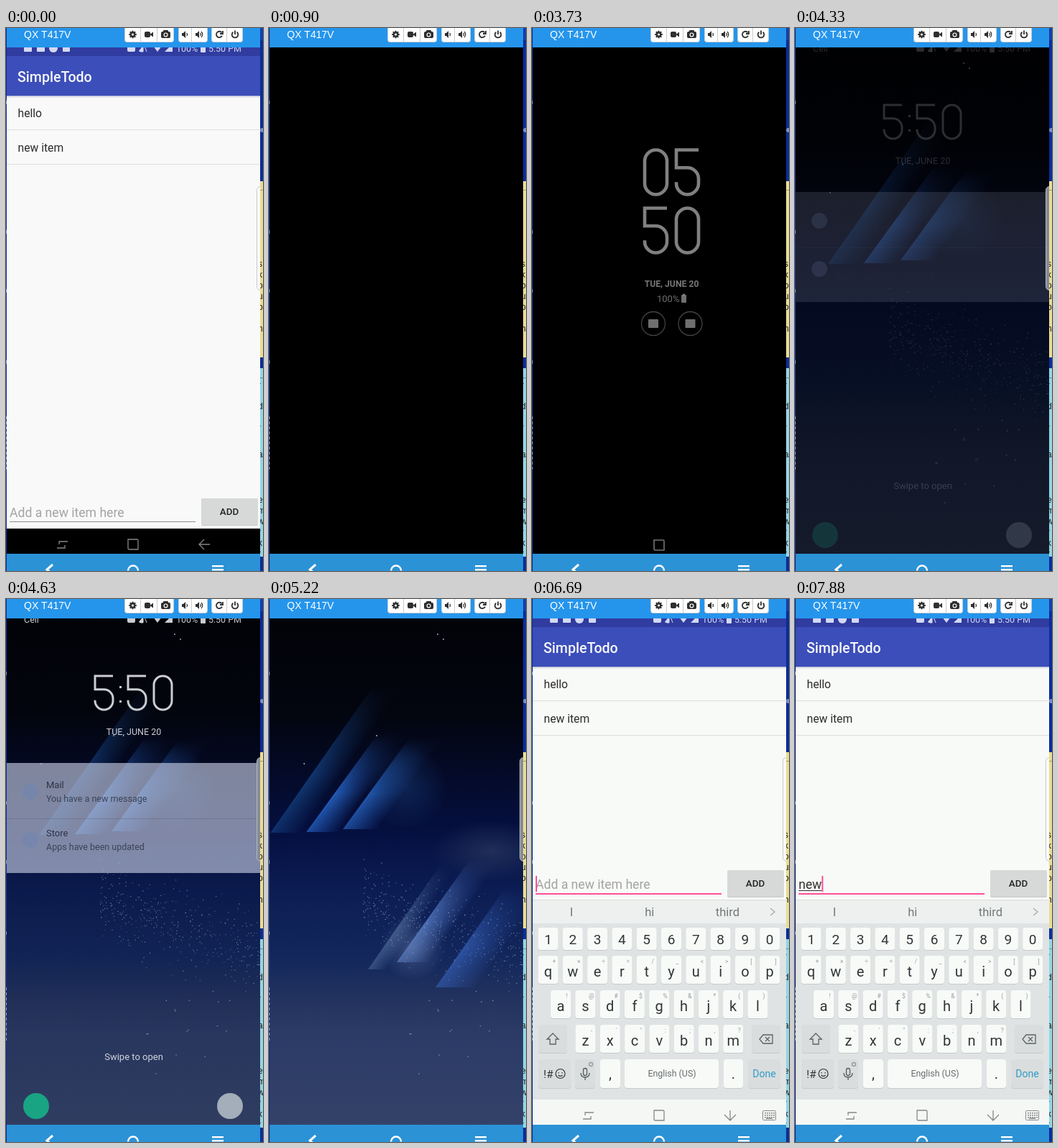
Recreate the animation shown at these times as an HTML page with a canvas. Size 358 by 755 pixels, loop 8000 ms.

```html
<!DOCTYPE html>
<html lang="en">
<head>
<meta charset="utf-8">
<title>Todo app on a mirrored phone</title>
<style>
  html, body { margin: 0; width: 100%; height: 100%; overflow: hidden; background: #0a2d9a; }
  canvas { display: block; }
</style>
</head>
<body>
<canvas id="stage" width="358" height="755"></canvas>
<script>
const LOOP = 8000, TICK = 148.68;
const ctx = document.getElementById('stage').getContext('2d');
const ROBOTO = 'Roboto, sans-serif', ARIAL = '"Liberation Sans", Arial, sans-serif';

function rect(x, y, w, h, color) { ctx.fillStyle = color; ctx.fillRect(x, y, w, h); }

function round(x, y, w, h, r, fill, stroke) {
  ctx.beginPath();
  ctx.roundRect(x, y, w, h, r);
  if (fill) { ctx.fillStyle = fill; ctx.fill(); }
  if (stroke) { ctx.strokeStyle = stroke; ctx.stroke(); }
}

function disc(x, y, r, fill, stroke) { round(x - r, y - r, 2 * r, 2 * r, r, fill, stroke); }

function text(s, x, y, size, color, { align = 'left', weight = 400, family = ROBOTO } = {}) {
  ctx.font = `${weight} ${size}px ${family}`;
  ctx.textAlign = align;
  ctx.fillStyle = color;
  ctx.fillText(s, x, y);
}

// Strokes an SVG path moved to (x, y); fills it as well when asked.
function icon(d, x, y, color, width = 1.5, filled = false) {
  const path = new Path2D(d);
  ctx.save();
  ctx.translate(x, y);
  ctx.strokeStyle = ctx.fillStyle = color;
  ctx.lineWidth = width;
  if (filled) ctx.fill(path);
  if (width) ctx.stroke(path);
  ctx.restore();
}

function faded(alpha, draw) {
  ctx.save();
  ctx.globalAlpha *= alpha;
  draw();
  ctx.restore();
}

function random(seed) {
  return () => (seed = (seed * 16807) % 2147483647) / 2147483647;
}

// ---- Desktop and mirror window ----

function desktop() {
  rect(0, 0, 358, 755, '#0a2d9a');
  rect(354, 0, 4, 17, '#123fae');
  rect(354, 213, 4, 245, '#eadc94');
  rect(354, 225, 4, 1, '#a39a68');
  rect(354, 473, 4, 262, '#94d5e4');
  rect(354, 486, 4, 1, '#5f929e');
  disc(357, 142, 3, '#7d8fc6');
  ctx.save();
  ctx.beginPath();
  ctx.rect(354, 0, 4, 755);
  ctx.clip();
  const column = (letters, y, step) =>
    [...letters].forEach((c, i) => text(c, 351, y + i * step, 12, '#1c1c1c', { family: ARIAL }));
  column(':', 242, 0);
  column('skoup h', 332, 15);
  column('r', 501, 0);
  column('dr', 530, 30);
  column('a', 597, 0);
  column('emwrkr', 660, 15);
  ctx.restore();
  for (const y of [101, 281, 363, 462]) rect(0, y, 1, 5, '#6f8fd0');
  for (let y = 540; y < 612; y += 7) rect(0, y, 1, 4, '#7f9cd8');
}

function toolbar() {
  const ink = '#2f2f2f';
  rect(1, 0, 353, 27, '#2595ec');
  text('QX T417V', 25, 14, 14, '#fff', { family: ARIAL });
  ctx.lineWidth = 1;
  for (const [x, w, ...dividers] of [[165, 69, 188, 211], [240, 41, 259], [286, 44, 308]]) {
    round(x + .5, -5.5, w - 1, 25, 3, '#fff', '#c4cdd4');
    dividers.forEach(d => rect(d - 1, 0, 1, 19, '#ccc'));
  }
  for (let i = 0; i < 4; i++) {
    const a = i * Math.PI / 4, c = 5.3 * Math.cos(a), s = 5.3 * Math.sin(a);
    icon(`M${-c} ${-s}L${c} ${s}`, 176.5, 9, ink, 2);
  }
  disc(176.5, 9, 3.9, ink);
  disc(176.5, 9, 1.6, '#fff');
  round(193, 5, 8, 8, 2, ink);
  icon('M0 0L4-3V4L0 1Z', 201, 8.5, ink, 0, true);
  round(216, 5, 13, 9, 2, ink);
  round(219, 3, 7, 4, 1, ink);
  disc(222.5, 9.4, 3, '#fff');
  disc(222.5, 9.4, 1.8, ink);
  const speaker = 'M-4-2H-2L1-5V5L-2 2H-4Z';
  icon(speaker, 249, 9, ink, 0, true);
  icon('M2.5-2Q4.5 0 2.5 2', 249, 9, ink, 1.2);
  icon(speaker, 268, 9, ink, 0, true);
  icon('M2.5-2Q4.5 0 2.5 2M4-4Q7.5 0 4 4', 268, 9, ink, 1.2);
  icon('M3.5-2.6A4.2 4.2 0 1 0 4 1.6M5-5V-1H1', 297, 9, ink, 1.8);
  icon('M-2.6-3.3A4.3 4.3 0 1 0 2.6-3.3M0-5.5V0', 319, 9, ink, 1.8);
}

function bottomBar() {
  rect(1, 731, 353, 24, '#2b92d6');
  icon('M5-6L-3 1L5 8', 60, 752, '#fff', 3);
  icon('M-7 0A7 7 0 0 1 7 0', 177, 754.5, '#fff', 2.4);
  for (const y of [747, 752]) rect(287, y, 16, 2.4, '#fff');
}

// ---- Phone parts ----

const HOME = 'M-2-7H5.5A1.5 1.5 0 0 1 7-5.5V7H2M-2 7H-5.5A1.5 1.5 0 0 1-7 5.5V-7H2M2 7H-2';

function navBar(keyboardOpen) {
  rect(1, 696, 353, 35, keyboardOpen ? '#f5f7f5' : '#000');
  const ink = keyboardOpen ? '#848987' : '#858585';
  icon('M8-4H-4V0M-7 5H4V1', 78, 718, ink, 1.3);
  icon(HOME, 177, 718, ink, 1.3);
  if (keyboardOpen) {
    icon('M0-7V7M-8-1L0 7L8-1', 276, 718, ink, 1.3);
    ctx.lineWidth = 1;
    round(321.5, 711.5, 18, 13, 1, null, ink);
    for (let y = 714; y < 721; y += 3)
      for (let x = 324; x < 338; x += 3) rect(x, y, 2, 1.5, ink);
    rect(326, 721.5, 9, 1.5, ink);
  } else {
    icon('M8 0H-7M0-7L-7 0L0 7', 276, 718, ink, 1.3);
  }
}

function statusIcons(color) {
  round(25, 23, 11, 10, 1, color);
  round(43, 22, 11, 11, 1, color);
  disc(66, 28, 6, color);
  round(79, 23, 10, 10, 1, color);
  statusRight(color);
}

function statusRight(color) {
  round(169, 23, 11, 10, 2, color);
  icon('M-3.5 3L2-4V4H-1Z M4-4L7 4', 189, 29, color, 1, true);
  icon('M-6-4Q0-9 6-4L0 4Z', 211, 29, color, 0, true);
  icon('M-5 4L6-7V4Z', 226, 29, color, 0, true);
  text('100%', 237, 33, 12.5, color);
  round(271, 24, 7, 10, 1, color);
  text('5:50 PM', 282, 33, 12.5, color);
}

function edgeHandle(fill, border) {
  ctx.lineWidth = 1;
  round(349.5, 220.5, 12, 144, 5, fill, border);
}

// ---- Todo app ----

function app({ typed = null, raised = false, smeared = false }) {
  rect(1, 27, 353, 704, smeared ? '#f6f6fa' : raised ? '#f8faf7' : '#f9f9f9');
  rect(1, 27, 353, 12, '#303c9f');
  statusIcons(smeared ? '#9da5d6' : '#d5d9f1');
  rect(1, 39, 353, 55, smeared ? '#4049b5' : '#3c4eb9');
  rect(1, 94, 353, 1, '#a9afd0');
  rect(1, 95, 353, 2, '#e6e7ec');
  text('SimpleTodo', 16, 75, 19.6, '#f6f7fc', { weight: 500 });
  text('hello', 16.5, 124, 15.7, '#2c2c2c');
  text('new item', 16.5, 172, 15.7, '#2c2c2c');
  if (smeared) smears();
  else for (const y of [142, 190]) rect(1, y - 1, 353, 1, '#dedede');

  const top = raised ? 377 : 654;
  round(272, top + 1, 79, 37, 2, '#c6c7c7');
  round(272, top, 79, 37, 2, smeared ? '#d9dddd' : '#d7d8d8');
  text('ADD', 311, top + 23, 13.4, '#252525', { weight: 500, align: 'center' });
  if (typed === null) {
    rect(5, top + 32, smeared ? 261 : 259, 1, '#8d8d8d');
    text('Add a new item here', smeared ? 3.5 : 5, top + 26, 17.6, smeared ? '#b4b4b6' : '#a3a3a3');
  } else {
    const pink = '#ff4f96';
    rect(5, top + 32, 259, 2, pink);
    if (!typed) text('Add a new item here', 5, top + 26, 17.6, '#a3a3a3');
    text(typed, 5, top + 26, 17.6, '#303030');
    const width = ctx.measureText(typed).width;
    if (typed) rect(5, top + 28, width, 1, '#303030');
    rect(5 + width, top + 8, 2, 22, pink);
  }
  navBar(false);
  if (!smeared) edgeHandle('#fafafa', '#c9c9c9');
}

function smears() {
  rect(88, 197, 243, 10, '#ecedf6');
  for (let x = 76; x < 331; x += 4) rect(x, 226, 3, 1, '#e3e4ec');
  rect(152, 289, 62, 2, '#e6e7f3');
  rect(226, 288, 84, 2, '#e8e9f3');
  rect(163, 403, 52, 2, '#e5e8ec');
  const next = random(77);
  for (let i = 0; i < 20; i++)
    rect(60 + next() * 200, 265 + next() * 330, 20 + next() * 60, 1 + next() * 7, i % 2 ? '#f1f5f5' : '#f2f2f8');
}

// ---- Keyboard ----

function keyboard() {
  const ink = '#303536', grey = '#dadddd', white = '#f8faf8';
  const key = (x, y, w, h, fill = white) => {
    round(x, y + 1, w, h, 4, '#c6caca');
    round(x, y, w, h, 4, fill);
  };
  const row = (letters, hints, x, y, h) => [...letters].forEach((c, i) => {
    const cx = x + i * 34.3;
    key(cx - 14, y, 28, h);
    text(c, cx, y + h / 2 + (hints ? 9 : 7), hints ? 20 : 19, ink, { align: 'center' });
    if (hints) text(hints[i], cx + 8.5, y + 11, 8.5, '#969c9c', { align: 'center' });
  });

  rect(1, 418, 353, 278, '#e0e3e3');
  rect(1, 418, 353, 33, '#eef0f0');
  rect(1, 418, 353, 1, '#dadddc');
  ['I', 'hi', 'third'].forEach((s, i) =>
    text(s, 55 + i * 108.7, 441, 16.5, '#727879', { align: 'center' }));
  icon('M-3-5L3 0L-3 5', 335, 435, '#a4a9a9', 1.3);
  row('1234567890', '', 22.5, 457, 31);
  row('qwertyuiop', '+×÷=/_<>[]', 22.5, 496, 39);
  row('asdfghjkl', '!@#$%&*()', 40, 544, 39);
  row('zxcvbnm', '-\'":;,?', 74.5, 592, 39);

  key(9, 592, 40, 39, grey);
  icon('M0-8L8 0H4V7H-4V0H-8Z', 29, 612, '#5b6162', 1.3);
  key(306, 592, 40, 39, grey);
  icon('M-9 0L-4-6H9V6H-4Z M-1-3L5 3M5-3L-1 3', 326, 612, '#5b6162', 1.3);
  key(9, 640, 45, 40, grey);
  text('!#', 16, 666, 15.5, ink);
  ctx.lineWidth = 1.2;
  disc(39.5, 660, 6.5, null, ink);
  icon('M-3 2Q0 5 3 2M-2.5-2V-.5M2.5-2V-.5', 39.5, 660, ink, 1.2);
  key(60, 640, 28, 40, grey);
  ctx.lineWidth = 1.3;
  round(71.5, 652.5, 5, 10, 2.5, null, '#555b5c');
  icon('M-6-1Q-6 5 0 5T6-1M0 5V9', 74, 660, '#555b5c', 1.3);
  ctx.lineWidth = 1.5;
  disc(82, 647, 2.5, null, '#9a9f9f');
  key(95, 640, 28, 40);
  text(',', 109, 667, 20, ink, { align: 'center' });
  key(129, 640, 131, 40);
  text('English (US)', 195, 664, 12.4, '#666c6d', { align: 'center' });
  key(267, 640, 27, 40);
  text('.', 280.5, 667, 20, ink, { align: 'center' });
  key(301, 640, 45, 40, grey);
  text('Done', 323.5, 665, 14, '#2f9bc9', { align: 'center' });
}

// ---- Clock and lock screens ----

function digit(c, x, y, w, h) {
  const r = w / 2;
  ctx.beginPath();
  if (c === '0') ctx.roundRect(x, y, w, h, r);
  else {
    const bend = y + h * .4;
    ctx.moveTo(x + w, y);
    ctx.lineTo(x, y);
    ctx.lineTo(x, bend);
    ctx.lineTo(x + r, bend);
    ctx.arcTo(x + w, bend, x + w, y + h, r);
    ctx.arcTo(x + w, y + h, x, y + h, r);
    ctx.arcTo(x, y + h, x, y, r);
    ctx.lineTo(x, y + h * .72);
  }
  ctx.stroke();
}

function clockScreen() {
  ctx.strokeStyle = '#fff';
  ctx.lineWidth = 4.6;
  ['05', '50'].forEach((pair, line) => [...pair].forEach((c, i) =>
    digit(c, 157 + i * 44, 169.5 + line * 81, 31, 62)));
  text('TUE, JUNE 20', 194.5, 360, 12.2, '#e9e9e9', { align: 'center', weight: 700 });
  text('100%', 174, 381, 13, '#e0e0e0');
  round(208, 371, 7, 11, 1, '#e0e0e0');
  rect(210, 369.5, 3, 2, '#e0e0e0');
  ctx.lineWidth = 1.3;
  for (const x of [169, 220.5]) {
    disc(x, 411, 16.5, null, '#858585');
    round(x - 7, 405, 14, 12, 1, '#dcdcdc');
  }
  icon(HOME, 177, 719, '#e8e8e8', 1.6);
}

// A slanted beam, brightest at its foot and left edge, built from thin strips.
function beam(x0, y0, x1, y1, width, rgb, alpha) {
  const strips = 10, step = width / strips;
  for (let i = 0; i < strips; i++) {
    const a = alpha * (1 - i / strips), x = i * step;
    const g = ctx.createLinearGradient(x0 + x, y0, x1 + x, y1);
    g.addColorStop(0, `rgba(${rgb},${a * .8})`);
    g.addColorStop(.4, `rgba(${rgb},${a})`);
    g.addColorStop(1, `rgba(${rgb},0)`);
    ctx.fillStyle = g;
    ctx.beginPath();
    ctx.moveTo(x0 + x, y0);
    ctx.lineTo(x1 + x, y1);
    ctx.lineTo(x1 + x + step, y1);
    ctx.lineTo(x0 + x + step, y0);
    ctx.fill();
  }
}

function glow(x, y, r, rgb, alpha) {
  const g = ctx.createRadialGradient(x, y, 0, x, y, r);
  g.addColorStop(0, `rgba(${rgb},${alpha})`);
  g.addColorStop(1, `rgba(${rgb},0)`);
  rect(x - r, y - r, 2 * r, 2 * r, g);
}

// open runs from 0 (locked) to 1 (unlocked): the upper beams slide, the lower ones appear.
function wallpaper(open) {
  const g = ctx.createLinearGradient(0, 27, 0, 731);
  [[0, '#020308'], [.19, '#03050f'], [.32, '#040b2b'], [.43, '#051042'], [.53, '#0b1c52'],
   [.67, '#13275c'], [.76, '#24345f'], [.82, '#2b3b66'], [1, '#344269']]
    .forEach(([at, color]) => g.addColorStop(at, color));
  rect(1, 27, 353, 704, g);
  ctx.save();
  ctx.translate(44 * (1 - open), 3 * (1 - open));
  beam(2, 325, 146, 120, 40, '22,72,140', .7);
  beam(52, 324, 152, 187, 42, '38,98,195', .9);
  beam(103, 320, 196, 193, 46, '38,98,190', .85);
  glow(190, 262, 58, '30,80,150', .35);
  ctx.restore();
  faded(open, () => {
    ctx.save();
    ctx.translate(310, 350);
    ctx.scale(2, 1);
    glow(0, 0, 42, '62,78,108', .45);
    ctx.restore();
    beam(138, 515, 240, 368, 24, '88,120,165', .6);
    beam(178, 505, 280, 362, 42, '84,122,195', .85);
    beam(232, 540, 330, 400, 54, '56,100,190', .7);
    glow(200, 485, 45, '120,140,185', .4);
  });
  const next = random(4321);
  for (let i = 0; i < 420; i++) {
    const u = next(), spread = next() + next() + next() - 1.5;
    rect(130 + u * 224, 420 + u * 70 + spread * 55, 1.2, 1.2, `rgba(180,198,230,${.2 + next() * .5})`);
  }
  for (let i = 0; i < 16; i++) rect(190 + next() * 150, 540 + next() * 120, 1.4, 1.4, '#7f8cad');
  for (const [x, y] of [[234, 48], [242, 55], [149, 189], [48, 228]]) rect(x, y, 2, 2, '#778196');
}

function lockItems() {
  const white = '#eef0f4', center = { align: 'center' };
  text('Cell', 25, 33, 12.5, white);
  statusRight(white);
  ctx.strokeStyle = white;
  ctx.lineWidth = 3;
  digit('5', 124, 107, 25, 47);
  digit('5', 170, 107, 25, 47);
  digit('0', 206, 107, 25, 47);
  for (const y of [121, 141]) rect(158, y, 3, 3, white);
  text('TUE, JUNE 20', 178, 189, 12.5, white, center);
  rect(1, 228, 353, 153, 'rgba(190,198,220,.78)');
  rect(1, 305, 353, 1, 'rgba(90,98,120,.5)');
  for (const [y, title, body] of [[268, 'Mail', 'You have a new message'], [335, 'Store', 'Apps have been updated']]) {
    disc(34, y, 11, '#7486ad');
    text(title, 56, y - 5, 13, '#1d2233');
    text(body, 56, y + 14, 12.5, '#30364a');
  }
  text('Swipe to open', 178, 641, 13, white, center);
  disc(42, 705, 18, '#16b88a');
  disc(312, 705, 18, '#b9c2cb');
}

function lockScreen(light, items, open) {
  faded(light, () => wallpaper(open));
  if (items) faded(items, lockItems);
  edgeHandle('#858c97', '#b4b9c1');
}

// ---- Timeline, in ticks ----

function screen(k) {
  rect(1, 27, 353, 704, '#000');
  if (k < 6) {
    app({});
    if (k > 3) rect(1, 27, 353, 704, `rgba(0,0,0,${k === 4 ? .45 : .82})`);
  } else if (k >= 15 && k < 28) {
    faded(k < 25 ? Math.min(.75, .28 + .1 * (k - 15)) : .5 - .2 * (k - 25), clockScreen);
  } else if (k >= 28 && k < 33) {
    lockScreen([.2, .4, .75, .92, 1][k - 28], [.08, .18, .5, .85, 1][k - 28], 0);
  } else if (k >= 33 && k < 38) {
    const open = Math.min(1, (k - 32) / 3);
    lockScreen(1, [1, .7, .3][k - 32] || 0, open);
    if (k > 35) faded(k === 36 ? .45 : .9, () => app({ smeared: true }));
  } else if (k >= 38 && k < 41) {
    app({ smeared: k === 38 });
  } else if (k >= 41) {
    app({ typed: 'new'.slice(0, k < 49 ? 0 : Math.floor((k - 47) / 2)), raised: k >= 44 });
    if (k > 41) {
      ctx.save();
      ctx.translate(0, [200, 80, 20][k - 42] || 0);
      keyboard();
      ctx.restore();
      navBar(true);
    }
  }
}

function frame() {
  const k = Math.floor((performance.now() % LOOP) / TICK);
  desktop();
  ctx.save();
  ctx.beginPath();
  ctx.rect(1, 27, 353, 704);
  ctx.clip();
  screen(k);
  ctx.restore();
  toolbar();
  bottomBar();
  requestAnimationFrame(frame);
}
frame();
</script>
</body>
</html>
```
